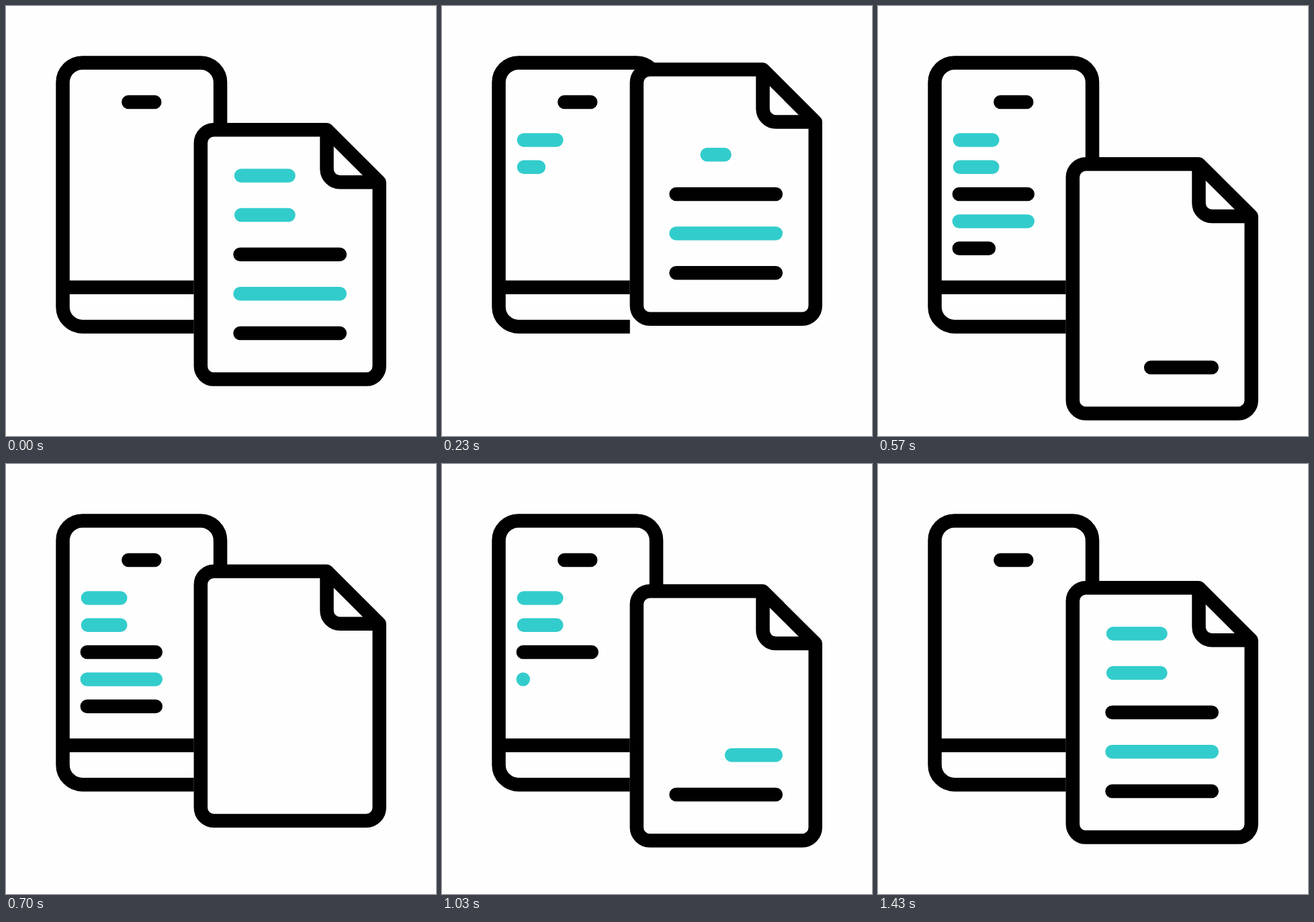
Write an HTML page that moves like this. It is 640 px wide and 640 px high and loops after 1670 ms.

```html
<!DOCTYPE html>
<html lang="en">
<head>
<meta charset="utf-8">
<title>Document transfer</title>
<style>
  html, body { margin: 0; width: 100%; height: 100%; overflow: hidden; background: #fefefe; }
  svg { display: block; width: 100vw; height: 100vh; }
  path { fill: none; stroke: #000; stroke-width: 20.5; stroke-linejoin: round; }
  .bar { stroke-linecap: round; }
  .teal { stroke: #33cccc; }
  .sheet { fill: #fefefe; }
</style>
</head>
<body>
<svg viewBox="0 0 640 640">
  <g id="phone">
    <path d="M279.7 477.2H113.8a29.3 29.3 0 0 1-29.3-29.3V113.8a29.3 29.3 0 0 1 29.3-29.3H289.7a29.3 29.3 0 0 1 29.3 29.3V245"/>
    <path d="M84.5 418.7H279.7"/>
    <path class="bar" d="M182.3 143H221.2"/>
  </g>
  <g id="doc">
    <path class="sheet" d="M477.5 184.3H309.3a19.5 19.5 0 0 0-19.5 19.5V536.1a19.5 19.5 0 0 0 19.5 19.5H536.2a19.5 19.5 0 0 0 19.5-19.5V262.2Z"/>
    <path d="M477.5 184.3V242.7a19.5 19.5 0 0 0 19.5 19.5H555.7"/>
  </g>
</svg>
<script>
const LOOP = 1670, STEP = 100 / 3;   // ms per loop, ms per step
const BARS = 5, SHORT = 2;           // the first two bars are short
const SCALE = 0.687;                 // bar size on the phone

const phone = document.getElementById('phone');
const doc = document.getElementById('doc');
const clamp = v => Math.min(1, Math.max(0, v));
const smooth = v => v * v * (3 - 2 * v);
const mix = (a, b, v) => a + (b - a) * v;

// Swing of the document, eased between turning points [step, offset]
const turns = [[0.25, 0], [7.6, -91.5], [16, 56], [23.85, -59], [35.05, 32], [43, 0]];

function offsetAt(k) {
  const i = Math.max(1, turns.findIndex(([end]) => k < end));
  const [k0, y0] = turns[i - 1], [k1, y1] = turns[i];
  return mix(y0, y1, smooth(clamp((k - k0) / (k1 - k0))));
}

// Progress of bar i when bars run one after another, unclamped
function run(k, i, start, shortDur, longDur, reverse) {
  const shorts = reverse ? (i < SHORT ? SHORT - 1 - i : 0) : Math.min(i, SHORT);
  const longs = reverse ? Math.min(BARS - 1 - i, BARS - SHORT) : Math.max(0, i - SHORT);
  const begin = start + shorts * shortDur + longs * longDur;
  return (k - begin) / (i < SHORT ? shortDur : longDur);
}

function addBar(parent, teal) {
  const el = document.createElementNS('http://www.w3.org/2000/svg', 'path');
  el.setAttribute('class', teal ? 'bar teal' : 'bar');
  return parent.appendChild(el);
}

const bars = Array.from({ length: BARS }, (_, i) => {
  const short = i < SHORT, teal = short || i === 3;
  return {
    x1: short ? 350.1 : 348.5,
    x2: short ? 420.5 : 496.8,
    y: 252.4 + 58.65 * i,
    onDoc: addBar(doc, teal),
    onPhone: addBar(phone, teal)
  };
});

function setBar(el, x1, x2, y, shown) {
  el.setAttribute('d', `M${x1} ${y}H${x2 + 0.01}`);
  el.style.display = shown ? '' : 'none';
}

function draw(k) {
  doc.setAttribute('transform', `translate(0 ${offsetAt(k).toFixed(2)})`);
  bars.forEach(({ x1, x2, y, onDoc, onPhone }, i) => {
    const gone = Math.min(run(k, i, 3, 2.45, 3.81), 1 - run(k, i, 24.36, 2.4, 4.6, true));
    setBar(onDoc, mix(x1, x2, clamp(gone)), x2, y, gone < 1);

    const here = Math.min(run(k, i, 3.29, 2.55, 3.54), 1 - run(k, i, 23.64, 2.5, 3.68, true));
    const left = 120.8 + (x1 - 348.5) * SCALE;
    const width = (x2 - x1) * SCALE * clamp(here);
    setBar(onPhone, left, left + width, 199.5 + (y - 252.4) * SCALE, here > -0.06);
  });
}

function tick() {
  const t = performance.now() % LOOP;
  draw(Math.min(43, Math.floor((t + 5) / STEP)) % 43);
  requestAnimationFrame(tick);
}
tick();
</script>
</body>
</html>
```
